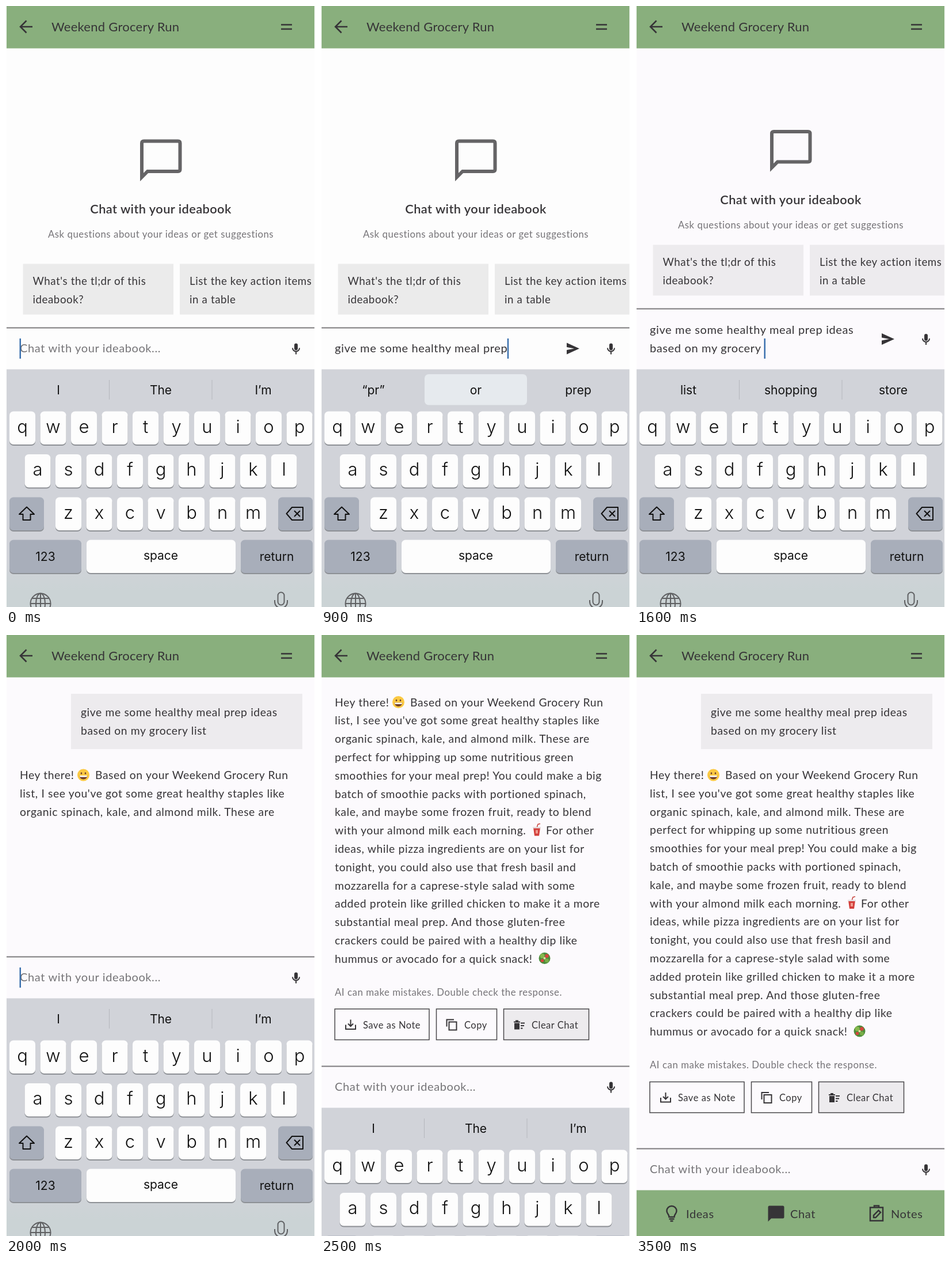
Recreate the animation shown at these times as an HTML page. Size 537x1043 px, loop 3600 ms.

```html
<!DOCTYPE html>
<html lang="en">
<head>
<meta charset="utf-8">
<title>Ideabook chat</title>
<style>
  html, body { margin: 0; width: 100%; height: 100%; overflow: hidden; background: #fff; }
  svg { display: block; width: 100%; height: 100%; }
  text { font-family: Lato, sans-serif; font-size: 19.3px; letter-spacing: .03em; word-spacing: .01em; fill: #363437; }
  .bar { font-size: 22px; letter-spacing: .012em; word-spacing: 0; }
  .title { font-size: 21.8px; font-weight: 600; letter-spacing: .018em; }
  .small { font-size: 16.8px; fill: #757377; }
  .button { font-size: 16.5px; }
  .chip-text { font-size: 18.7px; }
  .input { font-size: 20px; }
  .hint { font-size: 20px; fill: #757477; }
  .keys text { font-family: Inter, sans-serif; font-size: 21px; letter-spacing: 0; word-spacing: 0; text-anchor: middle; fill: #111; }
  .keys .letter { font-size: 31px; font-weight: 350; }
  .keys .big { font-size: 44px; font-weight: 350; }
  .line { fill: none; stroke: #363437; stroke-width: 2; }
  .solid { fill: #363437; }
  .mid { text-anchor: middle; }
</style>
</head>
<body>
<svg id="stage" viewBox="0 0 537 1043" preserveAspectRatio="none"></svg>
<script>
const STEP = 100, STEPS = 36, KEYBOARD_TOP = 630, NAV_TOP = 963, LEFT = 24;
const GREEN = '#89af7d';
const prompt = 'give me some healthy meal prep ideas based on my grocery list';
const WRAP = 37;

// Typed length, then the three suggestions; * marks the highlighted one.
const typing = [
  [0, 'I', 'The', 'I’m'],
  [4, '“give”', '*give', 'given'],
  [8, 'a', 'the', 'some'],
  [12, '“some”', '*some', 'something'],
  [16, '“hea”', '*hels', 'heads'],
  [19, '“health”', '*health', 'healthy'],
  [21, 'food', 'meals', 'and'],
  [23, '“me”', '*me', 'meal'],
  [27, 'plan', 'prep', 'ideas'],
  [30, '“pr”', '*or', 'prep'],
  [33, '“id”', '*is', 'ideas'],
  [37, 'for', 'and', 'to'],
  [41, '“base”', '*base', 'based'],
  [46, 'the', 'my', 'what'],
  [49, 'own', 'list', 'diet'],
  [53, '“groc”', '*grocery', 'groceries'],
  [57, 'list', 'shopping', 'store'],
  [58, '“l”', '*list', 'lists'],
  [61, '“list”', '*list', 'lists']
];
const SEND = typing.length;
const visibleLines = { 19: 0, 20: 3, 21: 7, 22: 11, 23: 15 };
const keyboardDrop = { 25: 190 };

const answer = [
  'Hey there!',
  "list, I see you've got some great healthy staples like",
  'organic spinach, kale, and almond milk. These are',
  'perfect for whipping up some nutritious green',
  'smoothies for your meal prep! You could make a big',
  'batch of smoothie packs with portioned spinach,',
  'kale, and maybe some frozen fruit, ready to blend',
  'with your almond milk each morning.',
  'ideas, while pizza ingredients are on your list for',
  'tonight, you could also use that fresh basil and',
  'mozzarella for a caprese-style salad with some',
  'added protein like grilled chicken to make it a more',
  'substantial meal prep. And those gluten-free',
  'crackers could be paired with a healthy dip like',
  'hummus or avocado for a quick snack!'
];

const text = (x, y, s, cls = '', extra = '') => `<text x="${x}" y="${y}" class="${cls}" ${extra}>${s}</text>`;
const rect = (x, y, w, h, fill, extra = '') => `<rect x="${x}" y="${y}" width="${w}" height="${h}" fill="${fill}" ${extra}/>`;
const path = (d, cls = 'line', extra = '') => `<path d="${d}" class="${cls}" ${extra}/>`;
const group = (id, body, extra = '') => `<g id="${id}" ${extra}>${body}</g>`;
const at = (x, y, body) => `<g transform="translate(${x} ${y})">${body}</g>`;

const smile = `<circle r="10.5" fill="#fbc943"/><path d="M-7 1H7Q6 7.500 0 7.500T-7 1" fill="#70402b"/>
  <path d="M-6.500 1H6.500L6 3.500H-6Z" fill="#fff"/><ellipse cx="-3.5" cy="-3" rx="1.3" ry="1.8" fill="#70402b"/><ellipse cx="3.5" cy="-3" rx="1.3" ry="1.8" fill="#70402b"/>`;
const cup = `<path d="M0 -4L2 -10L6 -11" fill="none" stroke="#c94a45" stroke-width="1.6"/>
  <path d="M-6 -4H6L4 10H-4Z" fill="#d3403c"/><path d="M-7 -5.5H7V-3H-7Z" fill="#e5dfe0"/><path d="M-2 0H2V6H-2Z" fill="#ef9b8f"/>`;
const salad = `<circle r="10" fill="#4c8c3b"/><circle cx="-4" cy="-4" r="4" fill="#86b84d"/><circle cx="4" cy="-4" r="3.2" fill="#d6463d"/>
  <circle cx="-4" cy="4" r="2.8" fill="#d6463d"/><circle cx="4" cy="4" r="3.5" fill="#77ae48"/><circle r="2" fill="#f0d9a0"/>`;
const mic = path('M-3 -6a3 3 0 0 1 6 0v6a3 3 0 0 1 -6 0Z', 'solid') + path('M-6 -1a6 6 0 0 0 12 0M0 5.5V10');

function emptyState() {
  const intro = path('M236 297V238Q236 234.500 239.500 234.500H299Q302.500 234.500 302.500 238V283.500Q302.500 287 299 287H246Z', 'line',
      'style="stroke:#656466;stroke-width:6"')
    + text(269, 360, 'Chat with your ideabook', 'title mid')
    + text(269, 402, 'Ask questions about your ideas or get suggestions', 'small mid');
  const chip = (x, w, a, b) => rect(x, 447.5, w, 88, '#ebebeb', 'class="chip"')
    + text(x + 17, 484, a, 'chip-text') + text(x + 17, 516, b, 'chip-text');
  return group('empty', group('intro', intro) + group('chips',
    chip(29.5, 261.5, "What's the tl;dr of this", 'ideabook?') + chip(302, 234, 'List the key action items', 'in a table')));
}

function conversation() {
  const lineY = i => 250 + i * 31.8;
  const extras = {
    0: at(134.5, 243, smile) + text(155, lineY(0), 'Based on your Weekend Grocery Run'),
    7: at(375, 465, cup) + text(391, lineY(7), 'For other'),
    14: at(388.5, 687.5, salad)
  };
  const lines = answer.map((s, i) => `<g class="reply">${text(LEFT, lineY(i), s)}${extras[i] || ''}</g>`).join('');
  const button = (x, w, label, textX, id) =>
    rect(x, 775.5, w, 53.5, 'none', `id="${id}" stroke="#4a484b" stroke-width="1.5"`) + text(textX, 809, label, 'button');
  const icons = path('M43 803V810.500H60V803M51.500 794V805M47 801L51.500 805.500L56 801')
    + path('M218.500 806V794H231M222.500 798H235.500V812H222.500Z')
    + path('M335 797H346V799H335ZM338 795H343V797H338ZM336 800H345V811H336Z', 'solid')
    + path('M347 800H354M347 804.500H353M347 809H350.500');
  const footer = text(LEFT, 752, 'AI can make mistakes. Double check the response.', 'small')
    + button(24, 164, 'Save as Note', 73, 'save') + button(200.5, 105, 'Copy', 249, 'copy')
    + button(317.5, 148, 'Clear Chat', 366, 'clear') + icons;
  return group('talk', rect(113, 102, 402, 96, '#edebee')
    + text(130, 141, prompt.slice(0, WRAP - 1)) + text(130, 173, prompt.slice(WRAP)) + lines + group('footer', footer));
}

// Coordinates are relative to the lower edge of the input area.
function inputArea() {
  return group('input', rect(1, -72, 535, 72.5, '#fdfdfd', 'id="panel"') + rect(1, -73, 535, 2, '#7c7b7d', 'id="divider"')
    + rect(0, -53, 0, 35, '#a3cafb', 'id="mark"')
    + text(LEFT, -29, 'Chat with your ideabook...', 'hint', 'id="hint"')
    + text(LEFT, -61, '', 'input', 'id="upper" xml:space="preserve"')
    + text(LEFT, -29, '', 'input', 'id="lower" xml:space="preserve"')
    + rect(0, -53, 2.5, 35, '#3a70ae', 'id="caret"')
    + group('tools', at(504, 0, mic) + path('M427 -10L449 0L427 10V2.500L440 0L427 -2.500Z', 'solid', 'id="send"')));
}

function navigation() {
  return rect(1, NAV_TOP, 535, 80, GREEN)
    + path('M57.500 1010C57.500 1005 53.500 1004.500 53.500 999.500a8.500 8.500 0 0 1 17 0C70.500 1004.500 66.500 1005 66.500 1010ZM57.500 1013.500H66.500M59.500 1017H64.500', 'line', 'style="stroke-width:2.5"')
    + text(87, 1012, 'Ideas', 'input')
    + path('M232 990.500H255Q257.500 990.500 257.500 993V1010Q257.500 1012.500 255 1012.500H235L229.500 1018V993Q229.500 990.500 232 990.500Z', 'solid')
    + text(268, 1012, 'Chat', 'input')
    + path('M407 993.500H429V1016.500H407ZM414 993V990.500H422V993M413 1011V1007L421.500 998.500L425 1002L416.500 1011Z', 'line', 'style="stroke-width:2.5"')
    + text(443, 1012, 'Notes', 'input');
}

function keyboard() {
  const key = (x, y, w, fill = '#fdfdfd') => rect(x, y + 1.5, w, 58, '#8d9095', 'rx="7"') + rect(x, y, w, 57.5, fill, 'rx="7"');
  const row = (letters, x, y) => [...letters].map((c, i) => {
    const left = x + i * 53.5;
    return key(left, y, 45) + text(left + 22.5, y + 37, c, 'letter');
  }).join('');
  const GREY = '#a8aeba';
  const suggestions = rect(179, 649, 1, 34, '#b5b7bd', 'class="split"') + rect(357.5, 649, 1, 34, '#b5b7bd', 'class="split"')
    + rect(180, 639, 178, 53.5, '#e6eaee', 'id="choice" rx="7"')
    + [91, 269, 447].map(x => text(x, 673.5, '', 'suggestion')).join('');
  const popup = path('M453 689H513Q523 689 523 699V749C523 764 506.500 765 506.500 780V829Q506.500 835.500 500 835.500H468Q461 835.500 461 829V780C461 765 443 764 443 749V699Q443 689 453 689Z',
      '', 'fill="#fdfdfd" stroke="#bfc1c6" stroke-width="1"') + text(483, 742, 'l', 'big');
  const globe = `<circle cx="60" cy="1037" r="17.5" class="line"/><ellipse cx="60" cy="1037" rx="8" ry="17.5" class="line"/>`
    + path('M60 1019.500V1043M42.500 1037H77.500M46 1028H74');
  const dictation = path('M472.500 1023a5.500 5.500 0 0 1 11 0V1034a5.500 5.500 0 0 1 -11 0ZM467 1031V1034a11 11 0 0 0 22 0V1031');
  return group('keyboard', rect(1, KEYBOARD_TOP + .5, 535, 413, 'url(#board)') + suggestions
    + row('qwertyuiop', 6, 703.5) + row('asdfghjkl', 32.5, 778) + row('zxcvbnm', 86, 852.5)
    + key(6, 852.5, 60, GREY) + key(473, 852.5, 60, GREY)
    + path('M36 869.500L49 882H42.500V892H29.500V882H23Z', 'line', 'stroke-linejoin="round" style="stroke:#111"')
    + path('M497 870H516V892H497L487.500 881ZM501 876L511 886M511 876L501 886', 'line', 'stroke-linejoin="round" style="stroke:#111"')
    + key(6, 926.5, 125, GREY) + key(140, 926.5, 259) + key(408, 926.5, 125, GREY)
    + text(68.5, 963, '123') + text(269, 961, 'space') + text(470.5, 962.5, 'return')
    + `<g opacity=".72">${globe}${dictation}</g>` + group('popup', popup), 'class="keys"');
}

const header = rect(1, 0, 535, 73.5, GREEN)
  + path('M46 36H25M35.500 25.500L25 36L35.500 46.500M478 32.500H497M478 40H497', 'line', 'style="stroke-width:2.6"')
  + text(79, 44, 'Weekend Grocery Run', 'bar');

const stage = document.getElementById('stage');
stage.innerHTML = `<defs><linearGradient id="board" x2="0" y2="1"><stop offset=".8" stop-color="#d1d3d9"/><stop offset=".93" stop-color="#cbd3d5"/></linearGradient></defs>`
  + rect(1, 0, 535, 1043, '#fdfdfd', 'id="page"') + emptyState() + conversation() + header + navigation() + inputArea() + keyboard();

const el = id => document.getElementById(id);
const all = cls => [...stage.querySelectorAll('.' + cls)];
const show = (node, on) => node.setAttribute('display', on ? 'inline' : 'none');
const shift = (id, y) => el(id).setAttribute('transform', `translate(0 ${y})`);
const set = (id, attrs) => Object.entries(attrs).forEach(([k, v]) => el(id).setAttribute(k, v));

function render(step) {
  const sent = step >= SEND;
  const [count, ...words] = typing[sent ? 0 : step];
  const typed = prompt.slice(0, count);
  const twoLines = count > WRAP;
  const drop = step >= 26 ? 413 : keyboardDrop[step] || 0;
  const bottom = Math.min(NAV_TOP, KEYBOARD_TOP + drop);
  const height = twoLines ? 105 : 72;
  const top = bottom - height;

  const paper = step < 12 ? '#fdfdfd' : '#fcfafd';
  set('page', { fill: paper });
  set('panel', { fill: paper, y: -height, height: height + .5 });
  set('divider', { y: -height - .5 });
  all('chip').forEach(c => c.setAttribute('fill', step < 12 ? '#ebebeb' : '#edebee'));

  show(el('empty'), !sent);
  shift('intro', (top - 558) / 2);
  shift('chips', top - 558);

  const lines = visibleLines[step] ?? answer.length;
  const complete = step >= 24;
  const contentEnd = complete ? 874.5 : 230 + lines * 31.8;
  show(el('talk'), sent);
  shift('talk', -Math.max(0, contentEnd - top));
  all('reply').forEach((line, i) => show(line, i < lines));
  show(el('footer'), complete);
  set('clear', { fill: step >= 25 ? '#edebee' : 'none' });

  shift('input', bottom);
  shift('tools', -height / 2 + .5);
  el('upper').textContent = twoLines ? typed.slice(0, WRAP - 1) : '';
  el('lower').textContent = twoLines ? typed.slice(WRAP) : typed;
  show(el('hint'), !count);
  show(el('send'), count);
  const caretX = LEFT + (count ? el('lower').getComputedTextLength() : 0);
  set('caret', { x: caretX - .5 });
  show(el('caret'), step < 22);

  const pressing = step === 4;
  show(el('mark'), pressing);
  if (pressing) {
    const wordX = LEFT + el('lower').getSubStringLength(0, 13) - 2;
    set('mark', { x: wordX, width: caretX - wordX });
  }

  const highlighted = words[1].startsWith('*');
  shift('keyboard', drop);
  show(el('popup'), pressing);
  show(el('choice'), highlighted);
  all('split').forEach(s => show(s, !highlighted));
  all('suggestion').forEach((s, i) => s.textContent = words[i].replace('*', ''));
}

const start = performance.now();
let current = -1;
function tick() {
  const step = Math.floor((performance.now() - start) / STEP) % STEPS;
  if (step !== current) render(current = step);
  requestAnimationFrame(tick);
}
tick();
</script>
</body>
</html>
```
